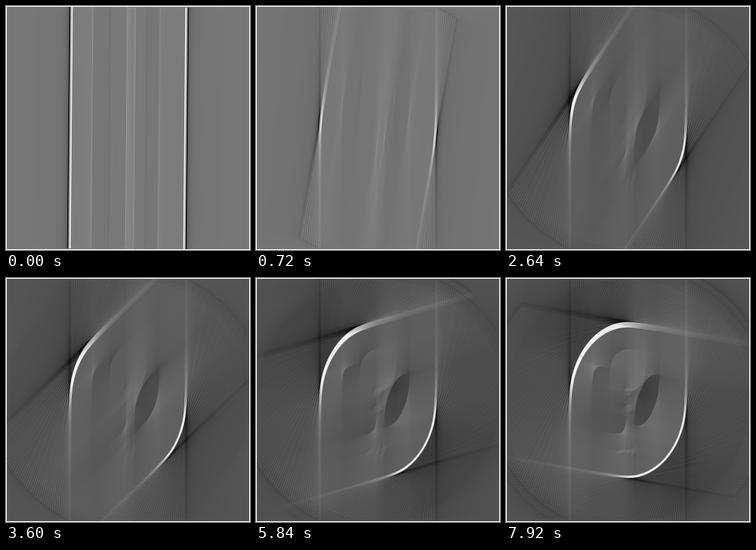
Recreate the animation shown at these times as an HTML page with a canvas. Size 305x306 px, loop 8000 ms.

```html
<!DOCTYPE html>
<html lang="en">
<head>
<meta charset="utf-8">
<title>Filtered back projection</title>
<style>
  html, body { margin: 0; width: 100%; height: 100%; overflow: hidden; background: #fff; }
  canvas { position: absolute; left: 1px; top: 1px; display: block; }
</style>
</head>
<body>
<canvas id="view"></canvas>
<script>
const W = 303, H = 304, MID = (W - 1) / 2, SCALE = 106.5;
const VIEWS = 100, STEP = 80, RAD = Math.PI / 180;

// Head phantom: overlapping ellipses whose values add up
const head = [];
const add = (value, a, b, x, y, tilt = 0) =>
  head.push({ value, a, b, x, y, tilt: tilt * RAD });

add(1, .69, .92, 0, 0);               // skull
add(-.8, .6624, .874, 0, -.0184);     // brain
for (const side of [-1, 1]) {
  add(-.2, .135 - .025 * side, .36 - .05 * side, .22 * side, 0, -18 * side);
  add(.1, .046, .046, 0, .1 * side);
}
add(.1, .21, .25, 0, .35);
for (const x of [-.08, 0, .06]) {     // three spots in a row
  add(.1, x < 0 ? .046 : .023, x > 0 ? .046 : .023, x, -.605);
}

// Ramp filter as a periodic kernel
const ramp = Float64Array.from({ length: W }, (_, n) => {
  let sum = 0;
  for (let k = 1; k <= MID; k++) sum += k * Math.cos(2 * Math.PI * k * n / W);
  return 2 * sum / (W * W);
});

// Line integrals through the head at one angle
function project(angle) {
  const p = new Float64Array(W);
  const c = Math.cos(angle), s = Math.sin(angle);
  for (const { value, a, b, x, y, tilt } of head) {
    const r2 = (a * Math.cos(angle + tilt)) ** 2 + (b * Math.sin(angle + tilt)) ** 2;
    const centre = x * c - y * s;
    for (let i = 0; i < W; i++) {
      const d = (i - MID) / SCALE - centre;
      if (d * d < r2) p[i] += 2 * value * a * b * SCALE * Math.sqrt(r2 - d * d) / r2;
    }
  }
  return p;
}

function filter(p) {
  return p.map((_, i) => p.reduce((sum, v, j) => sum + v * ramp[Math.abs(i - j)], 0));
}

// Cubic interpolation between detector bins
function sample(q, pos) {
  const i = Math.min(W - 2, Math.max(0, Math.floor(pos)));
  const f = Math.min(1, Math.max(0, pos - i));
  const b = q[i], c = q[i + 1];
  const a = i > 0 ? q[i - 1] : b, d = i < W - 2 ? q[i + 2] : c;
  return b + f / 2 * (c - a + f * (2 * a - 5 * b + 4 * c - d + f * (3 * (b - c) + d - a)));
}

// Smear one filtered view across the turned square
function smear(sum, q, angle) {
  const c = Math.cos(angle), s = Math.sin(angle), edge = W / 2;
  for (let row = 0, k = 0; row < H; row++) {
    const y = row - (H - 1) / 2;
    for (let col = 0; col < W; col++, k++) {
      const x = col - MID;
      const u = x * c + y * s, t = x * s - y * c;
      if (Math.abs(u) <= edge && Math.abs(t) <= edge) sum[k] += sample(q, u + MID);
    }
  }
}

// Stretch to the full grey range
function toGrey(sum) {
  let lo = Infinity, hi = -Infinity;
  for (const v of sum) {
    if (v < lo) lo = v;
    if (v > hi) hi = v;
  }
  const gain = 255 / (hi - lo);
  return Uint8ClampedArray.from(sum, v => (v - lo) * gain);
}

const total = new Float32Array(W * H);
const frames = [];
for (let i = 0; i < VIEWS; i++) {
  const angle = (i + .5) * RAD;
  smear(total, filter(project(angle)), angle);
  frames.push(toGrey(total));
}

const canvas = document.getElementById('view');
canvas.width = W;
canvas.height = H;
const ctx = canvas.getContext('2d');
const image = ctx.createImageData(W, H);
const pixels = new Uint32Array(image.data.buffer);
let shown = -1;

function show(i) {
  if (i === shown) return;
  shown = i;
  frames[i].forEach((g, k) => { pixels[k] = 0xff000000 | g * 0x010101; });
  ctx.putImageData(image, 0, 0);
}

const start = performance.now();
function tick() {
  const time = Math.max(0, performance.now() - start);
  show(Math.floor(time / STEP) % VIEWS);
  requestAnimationFrame(tick);
}
tick();
</script>
</body>
</html>
```
